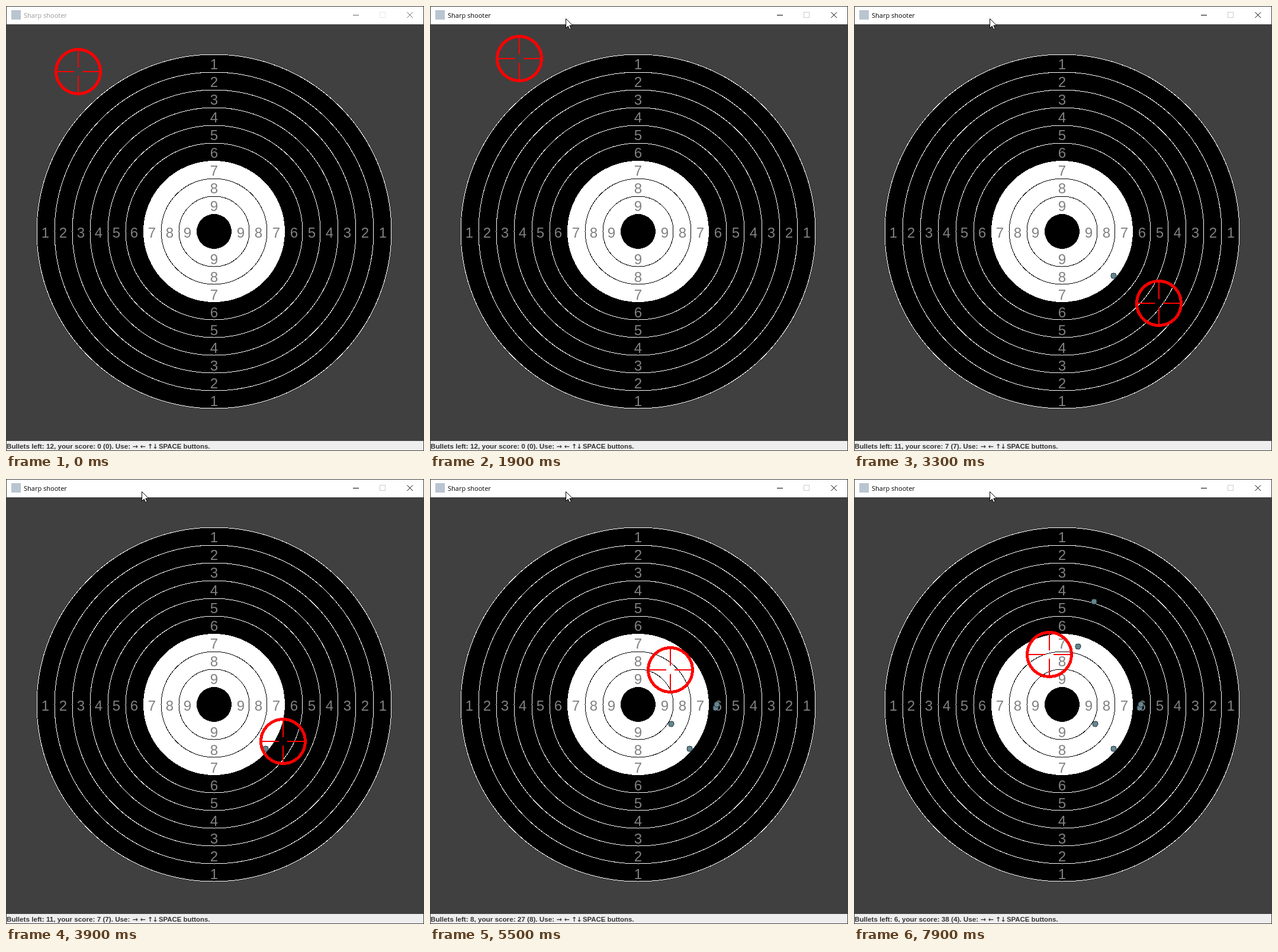
These frames come from a looping animation (706 by 753 pixels, 8000 ms). An HTML page:

```html
<!DOCTYPE html>
<html lang="en">
<head>
<meta charset="utf-8">
<title>Sharp shooter</title>
<style>
  html, body { margin: 0; width: 100%; height: 100%; overflow: hidden; }
  svg { display: block; width: 706px; height: 753px; }
  .crisp { shape-rendering: crispEdges; }
  text { white-space: pre; }
  #labels { font: 24px "Liberation Sans", sans-serif; fill: #808080; text-anchor: middle; }
  #caption { font: 11px "Open Sans", sans-serif; }
  #status { font: bold 11.7px "Liberation Sans", sans-serif; fill: #333; }
  #arrows { font: bold 11px "DejaVu Sans", sans-serif; text-anchor: middle; }
  #hint { font-size: 11.4px; }
</style>
</head>
<body>
<svg viewBox="0 0 706 753">
  <rect width="706" height="753" fill="#404040"/>
  <g id="rings" class="crisp"></g>
  <g id="labels"></g>
  <g id="holes" class="crisp"></g>
  <g id="sight" class="crisp" fill="none" stroke="#f00">
    <circle r="37.5" stroke-width="5"/>
    <path d="M-36 0H-7M7 0H36M0-36V-7M0 7V36" stroke-width="2"/>
  </g>

  <rect width="706" height="31" fill="#fff"/>
  <rect x="9" y="7" width="16" height="16" fill="#b9c5d0"/>
  <text id="caption" x="30" y="20">Sharp shooter</text>
  <g id="buttons" fill="none">
    <path class="crisp" d="M586 15.5h10"/>
    <path d="M677.5 10.5l9.5 9.5m0-9.5l-9.5 9.5"/>
  </g>
  <rect id="maximise" class="crisp" x="631.5" y="10.5" width="9" height="9" fill="none"/>

  <rect y="736" width="706" height="16" fill="#eee"/>
  <g id="status">
    <text id="score" x="1" y="749"></text>
    <g id="tail">
      <text id="arrows" x="218 231 243.5 252" y="749">→←↑↓</text>
      <text id="hint" x="258" y="749">SPACE buttons.</text>
    </g>
  </g>
  <rect class="crisp" x=".5" y=".5" width="705" height="752" fill="none" stroke="#3c3c3c"/>
  <path id="pointer" d="M229.5 21.5v16l3.7-3.6 2.5 5.6 2.6-1.1-2.5-5.5h5.2z" fill="#fff" stroke="#000"/>
</svg>
<script>
const $ = id => document.getElementById(id);
const STEP = 100, COUNT = 80, CX = 351.5, CY = 381.5, GAP = 30;

function add(parent, tag, attrs, text = "") {
  const el = document.createElementNS("http://www.w3.org/2000/svg", tag);
  for (const key in attrs) el.setAttribute(key, attrs[key]);
  el.textContent = text;
  parent.append(el);
  return el;
}

// Black rings 1 to 6, white 7 to 9, black bull; no outline where the fill changes
for (let ring = 1; ring <= 10; ring++) {
  const light = ring > 6 && ring < 10;
  add($("rings"), "circle", {
    cx: CX, cy: CY, r: GAP * (11 - ring) - 0.5,
    fill: light ? "#fff" : "#000",
    stroke: ring < 7 ? "#fff" : ring === 7 || ring === 10 ? "none" : "#000"
  });
  if (ring === 10) break;
  const d = GAP * (10.5 - ring);
  for (const [dx, dy] of [[0, -d], [0, d], [-d, 0], [d, 0]])
    add($("labels"), "text", { x: CX + dx, y: CY + dy + 10 }, ring);
}

// Shots: step, x, y
const shots = [
  [30, 438, 456], [43, 482, 387], [44, 484, 381],
  [50, 407, 414], [58, 378, 283], [66, 405, 207]
];
const points = ([, x, y]) => 10 - Math.floor(Math.hypot(x - CX, y - CY) / GAP);
const holes = shots.map(([, x, y]) => add($("holes"), "circle",
  { cx: x + 0.5, cy: y + 0.5, r: 4.6, fill: "#67858f", stroke: "#1d343d" }));

// The sight drifts smoothly through every shot and a few turning points
const path = [
  [0, 122, 111], [6, 173, 58], [10, 146, 74], [15, 157, 100], [19, 151, 89],
  [25, 242, 269], [27, 354, 371], [33, 515, 503], [39, 468, 444], [46, 424, 421],
  [55, 406, 323], [61, 383, 274], [63, 425, 195], [68, 380, 212], [72, 380, 212],
  [79, 330, 297], ...shots
].sort((a, b) => a[0] - b[0]);

// Pauses, and one skipped step in twelve while aiming
const still = n => n === 7 || n > 10 && n < 14 || n > 68 && n < 73 ||
  n > 15 && n < 68 && n % 12 === 4;

function slope(i, axis) {
  const a = path[Math.max(i - 1, 0)], b = path[Math.min(i + 1, path.length - 1)];
  return (b[axis] - a[axis]) / (b[0] - a[0]);
}

function sightAt(n, axis) {
  const i = Math.max(0, path.findIndex(p => p[0] >= n) - 1);
  const a = path[i], b = path[i + 1], span = b[0] - a[0], u = (n - a[0]) / span;
  return Math.round(
    a[axis] * (1 + 2 * u) * (1 - u) ** 2 + b[axis] * u * u * (3 - 2 * u) +
    span * u * (1 - u) * (slope(i, axis) * (1 - u) - slope(i + 1, axis) * u));
}

function draw(now) {
  const n = Math.floor(now / STEP) % COUNT, active = n > 0;
  let m = n;
  while (still(m)) m--;
  $("sight").setAttribute("transform", `translate(${sightAt(m, 1)} ${sightAt(m, 2)})`);

  const fired = shots.filter(s => s[0] <= n).map(points);
  holes.forEach((hole, i) => hole.setAttribute("display", i < fired.length ? "inline" : "none"));
  const total = fired.reduce((sum, p) => sum + p, 0);
  const left = 12 - fired.length;
  $("score").textContent = `Bullets left: ${left}, your score: ${total} (${fired.at(-1) ?? 0}). Use:`;
  const extra = `${left}${total}`.length - 3;
  $("tail").setAttribute("transform", `translate(${extra * 7} 0)`);

  $("caption").setAttribute("fill", active ? "#000" : "#999");
  $("buttons").setAttribute("stroke", active ? "#000" : "#666");
  $("maximise").setAttribute("stroke", active ? "#ccc" : "#e8e8e8");
  $("pointer").setAttribute("display", active ? "inline" : "none");
  requestAnimationFrame(draw);
}
draw(0);
</script>
</body>
</html>
```
